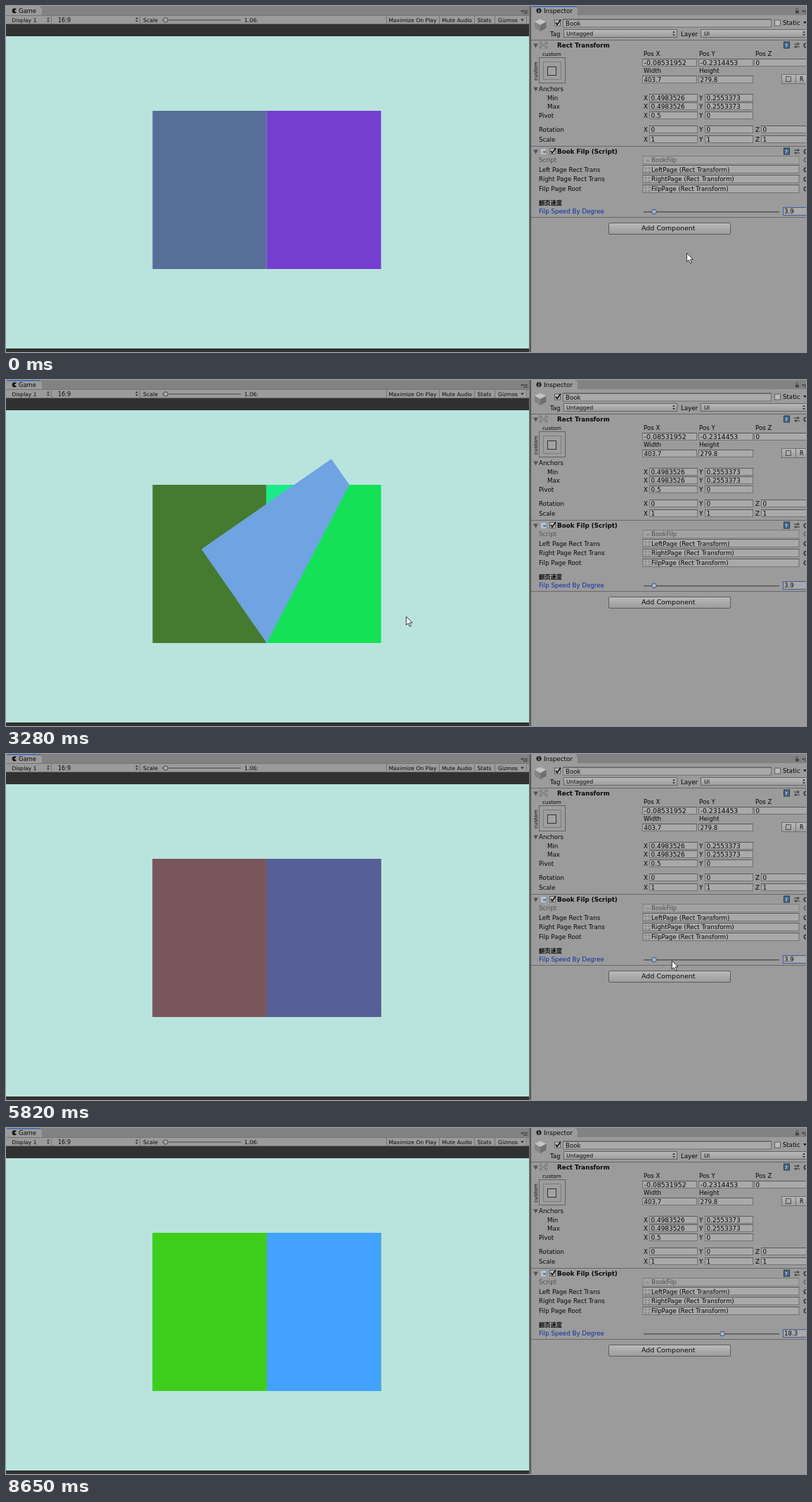
An HTML page that plays this animation: 1138x492 px, repeating every 8.99 s.

```html
<!DOCTYPE html>
<html lang="en">
<head>
<meta charset="utf-8">
<title>Book page flip</title>
<style>
html, body { margin: 0; width: 100%; height: 100%; overflow: hidden; background: #9b9b9b; }
svg { display: block; width: 1138px; height: 492px; }
text { font-family: "DejaVu Sans", sans-serif; fill: #080808; white-space: pre; }
.cjk { font-family: "Noto Sans CJK SC", "Noto Sans CJK", sans-serif; font-weight: bold; }
</style>
</head>
<body>
<svg id="stage" viewBox="0 0 1138 492" xmlns="http://www.w3.org/2000/svg">
  <defs>
    <clipPath id="mask"><rect x="208" y="103" width="326" height="272"/></clipPath>
    <linearGradient id="btn" x2="0" y2="1"><stop stop-color="#bababa"/><stop offset="1" stop-color="#9c9c9c"/></linearGradient>
  </defs>
  <g id="ui"></g>
  <rect id="focus" y="0" height="1.5" fill="#3c68b4"/>
  <rect id="left" x="208.5" y="149" width="162.1" height="225"/>
  <rect id="right" x="370.6" y="149" width="162.9" height="225"/>
  <g clip-path="url(#mask)"><polygon id="under"/><polygon id="flap"/></g>
  <circle id="knob" cy="292.5" r="3.3" fill="#a9b4ca" stroke="#34528e"/>
  <text id="value" x="1107" y="295.3" font-size="8.7"></text>
  <path id="cursor" d="M0 0V12.2L2.8 9.6L4.9 14.2L6.9 13.3L4.9 8.8H8.7Z" fill="#fff" stroke="#222" stroke-width=".9"/>
</svg>
<script>
const $ = id => document.getElementById(id);
const box = (x, y, w, h, fill, stroke) =>
  `<rect x="${x}" y="${y}" width="${w}" height="${h}" fill="${fill}"${stroke ? ` stroke="${stroke}"` : ''}/>`;
const path = (d, fill = 'none', stroke = 'none', width = 1) =>
  `<path d="${d}" fill="${fill}" stroke="${stroke}" stroke-width="${width}"/>`;
const label = (x, y, s, size = 8.65, more = '') => `<text x="${x}" y="${y}" font-size="${size}" ${more}>${s}</text>`;
const line = (x, y, w, fill) => box(x, y, w, 1, fill);
const fieldBox = (x, y, w, h = 11) => box(x + .5, y + .5, w - 1, h - 1, '#a9a9a9', '#717171') + line(x, y, w, '#585858');
const field = (x, y, w, s, size) => fieldBox(x, y, w) + label(x + 2.6, y + 8.8, s, size);
const fold = y => path(`M750 ${y - 2.5}h7l-3.5 6z`, '#555');
const check = (x, y, on) => box(x + .5, y + .5, 8, 8, '#bcbcbc', '#606060') +
  (on ? path(`M${x + 2} ${y + 4}l2 3l5 -7`, 'none', '#111', 1.6) : '');
const updown = (x, y) => path(`M${x} ${y - 1}l2 -2.5l2 2.5zM${x} ${y + 1}l2 2.5l2 -2.5z`, '#333');
const gear = (x, y) => `<circle cx="${x}" cy="${y}" r="2.7" fill="none" stroke="#333" stroke-width="1.6"/>`;
const bold = 'font-weight="bold"';

function gameView() {
  let s = box(0, 0, 744, 492, '#b9e4de') + box(0, 0, 1138, 13, '#828282') +
    path('M0 13V0H48L51 4V13Z', '#9b9b9b') +
    box(0, 13, 744, 13, '#9b9b9b') + line(0, 13, 744, '#747474') + line(0, 25, 744, '#707070') +
    box(0, 26, 744, 17, '#313131') + box(0, 487, 744, 5, '#313131') +
    path('M15 4.5A3.6 3.6 0 1 0 15 9L11.5 6.7Z', '#151515') +
    label(18, 10, 'Game', 8.4) + label(8.5, 22.7, 'Display 1', 7.55) + label(74, 22.7, '16:9', 8) +
    label(195, 22.7, 'Scale', 7.8) + label(339, 22.7, '1.06:', 7.8) +
    label(544.5, 22.7, 'Maximize On Play', 7.66) + label(620, 22.7, 'Mute Audio', 7.6) +
    label(670.5, 22.7, 'Stats', 7.8) + label(700, 22.7, 'Gizmos', 7.6) +
    updown(58, 19.5) + updown(184, 19.5) +
    line(222, 19.5, 112, '#494949') + '<circle cx="227" cy="20" r="3.2" fill="#aaa" stroke="#444"/>' +
    path('M732 18.5h5l-2.5 3zM732 6.5h4l-2 2.5z', '#333') + path('M736 6.5h6M736 8.5h6M736 10.5h6', 'none', '#444');
  for (const x of [64, 190, 541, 616, 666, 695, 740]) s += box(x, 14, 1, 11, '#747474');
  return s;
}

function inspector() {
  let s = box(744, 0, 3, 492, '#6a6a6a') + box(746, 0, 1, 492, '#4a4a4a') +
    box(747, 13, 391, 479, '#9b9b9b') + path('M747 13V0H810L813 4V13Z', '#9b9b9b') +
    '<circle cx="758" cy="6.5" r="3.6" fill="#222"/>' + box(757.5, 5.8, 1, 3, '#ddd') + box(757.5, 4, 1, 1, '#ddd') +
    label(765, 10, 'Inspector', 8.8) +
    box(1123, 6.5, 5, 4, '#444') + path('M1124 6.5V4.5Q1125.5 2.5 1127 4.5', 'none', '#444') +
    path('M1132 6.5h4l-2 2.5z', '#333') + path('M1136 6.5h3M1136 8.5h3M1136 10.5h3', 'none', '#444');

  s += path('M752 22.5L760 18.5L768.5 22.5L760 27Z', '#c4c4c4') + path('M752 22.5L760 27V36L752 31.5Z', '#858585') +
    path('M768.5 22.5L760 27V36L768.5 31.5Z', '#707070') +
    check(780, 19.5, true) + fieldBox(792, 18.5, 297, 12) + label(796, 27.5, 'Book') +
    check(1093, 19.5) + label(1105, 27, 'Static') + path('M1134 22h5l-2.5 3.5z', '#222') +
    label(774, 42.5, 'Tag') + label(960, 42.5, 'Layer') +
    box(793.5, 33.5, 161, 11, 'url(#btn)', '#646464') + label(797, 42.2, 'Untagged', 7.8) + updown(948, 39) +
    box(988.5, 33.5, 155, 11, 'url(#btn)', '#646464') + label(993, 42.2, 'UI', 7.8) + updown(1133, 39);

  for (const [y, name] of [[56, 'Rect Transform'], [207, 'Book Filp (Script)']])
    s += line(747, y - 8, 391, '#686868') + fold(y) + label(784, y + 3, name, 8.72, bold) +
      box(1106.5, y - 5, 8, 9, '#456a90', '#2c3a4a') + label(1108, y + 2.5, '?', 7, 'style="fill:#fff"') +
      path(`M1121 ${y - 2}h8M1121 ${y + 2}h8M1126.5 ${y - 4}v4M1123.5 ${y}v4`, 'none', '#333') + gear(1138, y);

  s += path('M759 51h3v3h-3zM767 51h3v3h-3zM759 57h3v3h-3zM767 57h3v3h-3zM762 54l5 3M762 57l5 -3', 'none', '#777') +
    label(763, 71, 'custom', 7.3) + label(0, 0, 'custom', 7.3, 'transform="translate(756 106) rotate(-90)"') +
    box(758.5, 73.5, 37, 36, '#9d9d9d', '#626262') + box(764.5, 79.5, 25, 25, 'none', '#7c7c7c') +
    box(770.5, 86.5, 12, 12, '#a2a2a2', '#333') +
    label(907, 71.3, 'Pos X') + label(986, 71.3, 'Pos Y') + label(1066, 71.3, 'Pos Z') +
    field(905, 75, 78, '-0.08531952', 9.4) + field(985, 75, 78, '-0.2314453', 9.3) + field(1064, 75, 78, '0') +
    label(907, 95.3, 'Width') + label(986, 95.3, 'Height') +
    field(905, 99, 78, '403.7') + field(985, 99, 78, '279.8') +
    box(1103.5, 97.5, 20, 13, 'url(#btn)', '#707070') + box(1123.5, 97.5, 20, 13, 'url(#btn)', '#707070') +
    '<rect x="1109.5" y="100.5" width="7" height="7" fill="none" stroke="#222" stroke-dasharray="2 1"/>' +
    label(1129, 107, 'R', 8) + fold(118) + label(758, 121.2, 'Anchors');

  const rows = [[130.5, 'Min', '0.4983526', '0.2553373'], [142.5, 'Max', '0.4983526', '0.2553373'],
    [156, 'Pivot', '0.5', '0'], [176, 'Rotation', '0', '0', '0'], [189.5, 'Scale', '1', '1', '1']];
  for (const [y, name, ...values] of rows) {
    s += label(name[0] === 'M' ? 770 : 758, y + 3, name);
    values.forEach((v, i) => {
      const x = [915, 994, 1074][i];
      s += label(x - 8, y + 3, 'XYZ'[i]) + field(x, Math.floor(y - 5.5), 69, v, 8.9);
    });
  }

  const slots = [[219, 'Script', 'BookFilp'], [232.7, 'Left Page Rect Trans', 'LeftPage (Rect Transform)'],
    [246.2, 'Right Page Rect Trans', 'RightPage (Rect Transform)'], [260, 'Filp Page Root', 'FilpPage (Rect Transform)']];
  slots.forEach(([y, name, v], i) => {
    const dim = i ? '' : 'opacity=".5"';
    s += `<g ${dim}>` + label(758, y + 3.1, name) + fieldBox(905.5, Math.floor(y - 6), 223, 12) +
      label(918, y + 3.1, v) +
      (i ? path(`M909 ${y - 3}h2v2h-2zM914 ${y - 3}h2v2h-2zM909 ${y + 2}h2v2h-2zM914 ${y + 2}h2v2h-2z`, 'none', '#858585')
         : box(911, y, 4, 2, '#777')) + gear(1138, y) + '</g>';
  });

  return s + box(761, 203, 7, 8, '#b8c4cc') + box(764, 206, 4, 3, '#5b87ae') + check(773, 202, true) +
    label(758, 283, '翻页速度', 8.25, 'class="cjk"') +
    label(758, 295.3, 'Filp Speed By Degree', 8.7, 'style="fill:#0a2fa6"') +
    box(907, 292, 193, 1.5, '#555') + box(1105.5, 286.5, 40, 11, '#a9a9a9', '#3c59a0') +
    line(747, 300, 391, '#686868') +
    '<rect x="857.5" y="308.5" width="173" height="16" rx="1.5" fill="url(#btn)" stroke="#5c5c5c"/>' +
    label(904, 319.4, 'Add Component', 9.5);
}
$('ui').innerHTML = gameView() + inspector();

const LOOP = 8990, W = 162.5, H = 225, SPINE = 370.8, FLOOR = 374;

// start ms, ms per step, degrees per step, side lifted (1 right, -1 left), back colour, revealed colour
const flips = [
  [1660, 26.4, 3.9, 1, '#447b30', '#1ce98a'],
  [2850, 26.25, 3.9, 1, '#6fa3e1', '#14e155'],
  [3890, 27.08, 3.9, -1, '#363a0a', '#ae8fb0'],
  [4780, 27, 3.69, -1, '#565f96', '#79565c'],
  [6870, 26, 18.3, -1, '#449416', '#70eeec'],
  [7250, 27, 18.3, 1, '#3fcd1b', '#43a2ff']
];

// time, x, y
const route = [[0, 968.5, 351.5], [30, 968.5, 351.5], [130, 1020, 415], [300, 880, 372], [510, 587.5, 334.5],
  [690, 587, 334.5], [870, 575.5, 335], [1230, 575, 335], [1500, 570, 336], [1660, 569.3, 336.3],
  [4780, 569.3, 336.3], [5030, 684.5, 307.3], [5650, 986, 300], [5700, 986, 300], [5900, 922, 290],
  [5960, 922, 290], [6280, 1019, 291], [6350, 1019, 291], [6590, 800, 308], [6850, 635, 318.5],
  [7250, 635, 318.5], [8130, 930, 291.5], [8160, 932, 292], [8650, 1128, 495], [LOOP, 1128, 495]];

function pointer(t) {
  const i = route.findIndex(p => p[0] > t), [t0, x0, y0] = route[i - 1], [t1, x1, y1] = route[i];
  const k = (t - t0) / (t1 - t0);
  return [x0 + (x1 - x0) * k, y0 + (y1 - y0) * k];
}

function drawBook(t) {
  let left = '#576e98', right = '#763fcf', now = null;
  for (const flip of flips) {
    if (t < flip[0]) break;
    if (now) [left, right] = now[3] > 0 ? now.slice(4) : now.slice(4).reverse();
    now = flip;
  }
  $('left').setAttribute('fill', left);
  $('right').setAttribute('fill', right);
  const [start, step, speed, side, back, fresh] = now || [t, 1, 0, 1];
  const deg = Math.min(90, speed * Math.floor((t - start + 5) / step));
  const a = deg * Math.PI / 180, tan = Math.tan(a);
  const lifted = !deg ? [] : W * tan <= H ? [[0, 0], [W, 0], [W, W * tan]]
    : [[0, 0], [W, 0], [W, H], [H / tan, H]];
  const c = Math.cos(2 * a), n = Math.sin(2 * a);
  const place = pts => pts.map(([u, v]) => [SPINE + side * u, FLOOR - v]).join(' ');
  $('under').setAttribute('points', place(lifted));
  $('under').setAttribute('fill', fresh);
  $('flap').setAttribute('points', place(lifted.map(([u, v]) => [u * c + v * n, u * n - v * c])));
  $('flap').setAttribute('fill', back);
}

function frame(ms) {
  const t = ms % LOOP;
  drawBook(t);
  const drag = Math.min(1, Math.max(0, (t - 5960) / 320));
  $('knob').setAttribute('cx', 922 + 97 * drag);
  $('value').textContent = (3.9 + 14.4 * drag).toFixed(1);
  const onGame = t >= 1050 && t < 5920 || t >= 6850;
  $('focus').setAttribute('x', onGame ? 1 : 748);
  $('focus').setAttribute('width', onGame ? 48 : 64);
  $('cursor').setAttribute('transform', `translate(${pointer(t)})`);
  requestAnimationFrame(frame);
}
requestAnimationFrame(frame);
</script>
</body>
</html>
```
